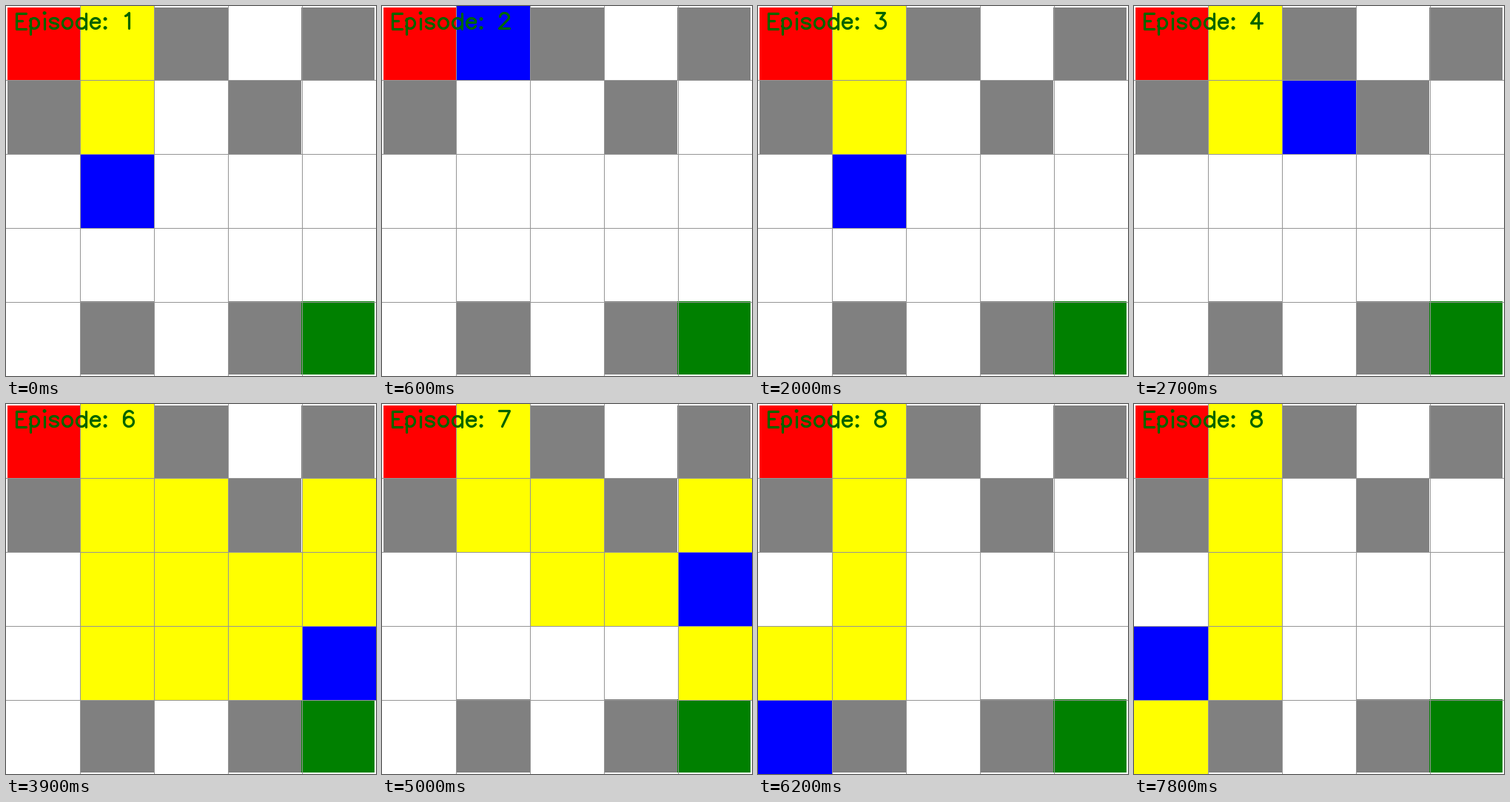
A matplotlib script that plays this animation: 500x500 px, repeating every 8000 ms.

```python
import numpy as np
import matplotlib.pyplot as plt
from matplotlib.animation import FuncAnimation
from matplotlib.collections import LineCollection
from matplotlib.patches import Rectangle

SIZE, CELL, N = 500, 100, 5
FRAMES, INTERVAL = 80, 100
GRAY, LINE, INK = "#808080", "#969696", "#006400"
START, GOAL = (0, 0), (4, 4)
WALLS = [(0, 2), (0, 4), (1, 0), (1, 3), (4, 1), (4, 3)]
STEP = {"U": (-1, 0), "D": (1, 0), "L": (0, -1), "R": (0, 1)}

# One word per tick: the moves made since the last tick, "." when blocked.
EPISODES = [
    "RDD DR D UR RU D",
    "R L R L R . . DDL D D U R R R",
    "RDD U . DR DD UR",
    "RD R DR R",
    "RDD",
    "RD DDR RULU . . DRRU . D D .",
    ". RD RD RRU . . . D D U U D D U U D U . DD",
    "RD DD LD" + " ." * 9 + " U . D . U D U .",
]


def walk():
    """List (episode, agent, trail) for every tick."""
    states = []
    for number, script in enumerate(EPISODES, 1):
        pos, trail = START, set()
        for word in script.split():
            for move in word.strip("."):
                dr, dc = STEP[move]
                pos = (pos[0] + dr, pos[1] + dc)
                trail.add(pos)
            states.append((number, pos, frozenset(trail)))
    return states


# Stroke lettering: x from the glyph's left, y from the baseline, down positive.
def arc(cx, cy, rx, ry, a0=0, a1=360):
    a = np.radians(np.linspace(a0, a1, 25))
    return list(zip(cx + rx * np.cos(a), cy - ry * np.sin(a)))


def bowl(a0, a1):
    return arc(9.5, -7, 6.5, 7, a0, a1)


def dot(y):
    return arc(4.5, y, 0.8, 0.8)


GLYPHS = {
    "E": (19, [[(16, -21), (3, -21), (3, 0), (16, 0)], [(3, -11), (11, -11)]]),
    "p": (18, [[(3, -14), (3, 7)], arc(8.5, -7, 6.5, 7, 148, -148)]),
    "i": (9, [dot(-21), [(4, -14), (4, 0)]]),
    "s": (17, [arc(8.5, -10.75, 5.5, 3.25, 5, 240)
               + arc(8.5, -3.5, 5.5, 3.5, 60, -170)]),
    "o": (19, [bowl(0, 360)]),
    "d": (19, [[(15, -21), (15, 0)], bowl(32, 328)]),
    "e": (18, [[(3, -8), (15, -8)] + bowl(28, 328)]),
    ":": (10, [dot(-13), dot(-1)]),
    " ": (16, []),
    "1": (20, [[(6, -17), (8, -18), (11, -21), (11, 0)]]),
    "2": (20, [arc(10, -15.5, 6, 5.5, 175, -35) + [(3, 0), (17, 0)]]),
    "3": (20, [[(5, -21), (16, -21), (10, -13)]
               + arc(10, -6.5, 7, 6.5, 70, -160)]),
    "4": (20, [[(13, 0), (13, -21), (3, -7), (18, -7)]]),
    "5": (20, [[(15, -21), (5, -21), (4, -12)] + arc(10, -7, 7, 7, 135, -160)]),
    "6": (20, [arc(11, -12, 7, 9, 45, 180) + arc(10.5, -6.5, 6.5, 6.5, 180, 540)]),
    "7": (20, [[(3, -21), (17, -21), (7, 0)]]),
    "8": (20, [arc(10, -16.75, 6, 4.25), arc(10, -6.25, 7, 6.25)]),
}


def lettering(text, x=10.5, y=30.5):
    lines = []
    for ch in text:
        advance, strokes = GLYPHS[ch]
        lines += [np.array(s) + (x, y) for s in strokes]
        x += advance
    return lines


fig = plt.figure(figsize=(SIZE / 100, SIZE / 100), dpi=100, facecolor="white")
ax = fig.add_axes([0, 0, 1, 1])
ax.set_xlim(0, SIZE)
ax.set_ylim(SIZE, 0)
ax.axis("off")


def box(x0, y0, x1, y1, color, z):
    return ax.add_patch(Rectangle((x0, y0), x1 - x0, y1 - y0, facecolor=color,
                                  linewidth=0, antialiased=False, zorder=z))


# The board itself sits inside a thin margin; the agent's cells do not.
EDGES = np.linspace(2, SIZE - 2, N + 1).round()


def fixed_cell(cell, color):
    r, c = cell
    box(EDGES[c], EDGES[r], EDGES[c + 1], EDGES[r + 1], color, 1)


def live_cell(r, c):
    x, y = c * CELL, r * CELL
    return box(x, y, x + CELL, y + CELL, "yellow", 2)


for wall in WALLS:
    fixed_cell(wall, GRAY)
fixed_cell(START, "red")
fixed_cell(GOAL, "green")
cells = {(r, c): live_cell(r, c) for r in range(N) for c in range(N)}
for k in range(CELL, SIZE, CELL):
    box(k, 0, k + 1, SIZE, LINE, 3)
    box(0, k, SIZE, k + 1, LINE, 3)

label = LineCollection([], colors=INK, linewidths=3.2 * 0.72, capstyle="round",
                       joinstyle="round", zorder=4)
ax.add_collection(label, autolim=False)

STATES = walk()


def draw(tick):
    number, agent, trail = STATES[tick]
    for pos, patch in cells.items():
        patch.set_visible(pos == agent or pos in trail)
        patch.set_facecolor("blue" if pos == agent else "yellow")
    label.set_segments(lettering(f"Episode: {number}"))
    return [*cells.values(), label]


anim = FuncAnimation(fig, draw, frames=FRAMES, interval=INTERVAL,
                     repeat=True, repeat_delay=0, blit=False)
plt.show()
```
